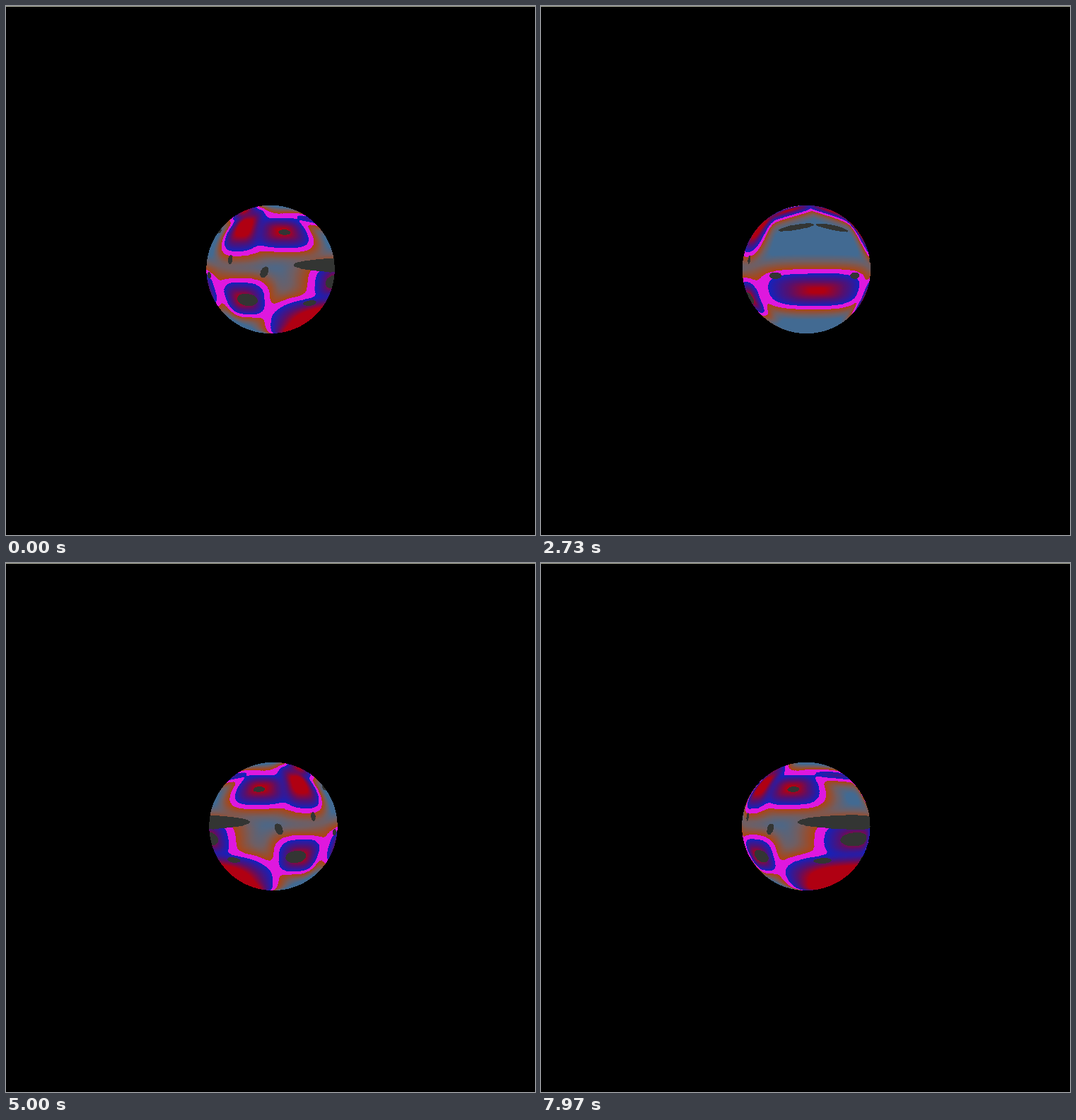
An HTML page with a canvas that plays this animation: 748 by 748 pixels, repeating every 8000 ms.

```html
<!DOCTYPE html>
<html lang="en">
<head>
<meta charset="utf-8">
<title>Rotating planet</title>
<style>
  html, body { margin: 0; width: 100%; height: 100%; overflow: hidden; background: #000; }
  canvas { display: block; }
</style>
</head>
<body>
<canvas id="stage" width="748" height="748"></canvas>
<script>
const LOOP = 8000;
const START_TURN = -105, DEGREES_PER_MS = .0419;
const RADIUS = 90.7, CENTER_Y = 372.4;
const DISTANCE = 10, SCALE = Math.sqrt(DISTANCE * DISTANCE - 1);
const RAD = Math.PI / 180;

// All angles are degrees. Longitude runs 0 to 180; the other half of the globe mirrors it.
const oval = (lon, lat, rx, ry, tilt = 0) =>
  ({ lon, lat, rx, ry, cos: Math.cos(tilt * RAD), sin: Math.sin(tilt * RAD) });

const seas = [
  oval(0, -17.5, 50, 16),
  oval(79, -26, 23, 17),
  oval(180, -55, 79, 33),
  oval(180, -11, 38, 16),
  oval(76, 38, 22, 25),
  oval(117, 33, 30, 17),
  oval(180, 50, 50, 6.5),
  oval(45, 63, 60, 15, -17)
];

const spots = [
  oval(180, 3.5, 56, 6),
  oval(180, -11, 19, 6),
  oval(100, -2.3, 4.9, 3, 66),
  oval(69, 8.2, 2.4, 3.8),
  oval(83, -26.2, 10.2, 5.8),
  oval(147, -29.6, 9, 2.7),
  oval(118.6, 32.2, 6, 2.7),
  oval(20, 37.6, 19, 3, -9),
  oval(36, -5.2, 5.8, 2.7)
];

// 0 at the centre of an oval, 1 on its rim; a higher power makes it boxier.
function reach(o, lon, lat, power) {
  const dx = lon - o.lon, dy = lat - o.lat;
  const a = Math.abs(dx * o.cos + dy * o.sin) / o.rx;
  const b = Math.abs(dy * o.cos - dx * o.sin) / o.ry;
  return (a ** power + b ** power) ** (1 / power);
}

function smoothMin(a, b, blend) {
  const h = Math.max(0, 1 - Math.abs(a - b) / blend);
  return Math.min(a, b) - h * h * blend / 4;
}

// Approximate distance from the nearest coast, negative in the sea
const heightAt = (lon, lat) => seas.reduce((height, sea) =>
  smoothMin(height, (reach(sea, lon, lat, 3) - 1) * Math.min(sea.rx, sea.ry), 6), Infinity);

const SHORE_WIDTH = 1.8, FULL_HEIGHT = 14;
const SHORE = [222, 24, 222], DARK = [51, 53, 51];
const SEA = [[18, 34, 190], [84, 16, 112], [176, 0, 18]];
const LAND = [[172, 68, 18], [112, 94, 98], [66, 106, 146]];

function ramp(colors, t) {
  const i = t < .5 ? 0 : 1, k = t * 2 - i;
  return colors[i].map((from, ch) => from + (colors[i + 1][ch] - from) * k);
}

function colorAt(lon, lat) {
  if (spots.some(spot => reach(spot, lon, lat, 2) < 1)) return DARK;
  const height = heightAt(lon, lat), rise = Math.abs(height) - SHORE_WIDTH;
  if (rise < 0) return SHORE;
  return ramp(height < 0 ? SEA : LAND, Math.min(1, rise / (FULL_HEIGHT - SHORE_WIDTH)));
}

const STEPS = 3, SIDE = 180 * STEPS + 1;
const texture = new Uint8ClampedArray(SIDE * SIDE * 3);
for (let r = 0; r < SIDE; r++)
  for (let c = 0; c < SIDE; c++)
    texture.set(colorAt(c / STEPS, 90 - r / STEPS), (r * SIDE + c) * 3);

const ctx = document.getElementById("stage").getContext("2d");
ctx.fillStyle = "#000";
ctx.fillRect(0, 0, 748, 748);
ctx.fillStyle = "#b9baa8";
ctx.fillRect(0, 0, 748, 1);

const LEFT = 278, TOP = 276, SIZE = 196;
const image = ctx.createImageData(SIZE, SIZE);

// Depth of the sphere point that a perspective camera sees at a squared distance from the disc centre
function depthAt(squared) {
  const q = squared / (SCALE * SCALE), qd = q * DISTANCE;
  return (qd + Math.sqrt(Math.max(0, qd * qd - (1 + q) * (qd * DISTANCE - 1)))) / (1 + q);
}

function draw(t) {
  const turn = START_TURN + DEGREES_PER_MS * t;
  const centerX = 375.8 + 2.2 * Math.cos((turn - 112) * RAD);
  const px = image.data;
  for (let j = 0; j < SIZE; j++) {
    const v = (CENTER_Y - TOP - j - .5) / RADIUS;
    for (let i = 0; i < SIZE; i++) {
      const u = (LEFT + i + .5 - centerX) / RADIUS, o = (j * SIZE + i) * 4;
      px[o + 3] = 255;
      if (u * u + v * v >= 1) {
        px[o] = px[o + 1] = px[o + 2] = 0;
        continue;
      }
      const z = depthAt(u * u + v * v), f = (DISTANCE - z) / SCALE;
      const lat = Math.asin(Math.max(-1, Math.min(1, v * f))) / RAD;
      let lon = Math.abs(Math.atan2(u * f, z) / RAD - turn) % 360;
      if (lon > 180) lon = 360 - lon;
      const k = (Math.round((90 - lat) * STEPS) * SIDE + Math.round(lon * STEPS)) * 3;
      px[o] = texture[k];
      px[o + 1] = texture[k + 1];
      px[o + 2] = texture[k + 2];
    }
  }
  ctx.putImageData(image, LEFT, TOP);
}

const start = performance.now();
function frame() {
  draw((performance.now() - start) % LOOP);
  requestAnimationFrame(frame);
}
frame();
</script>
</body>
</html>
```
